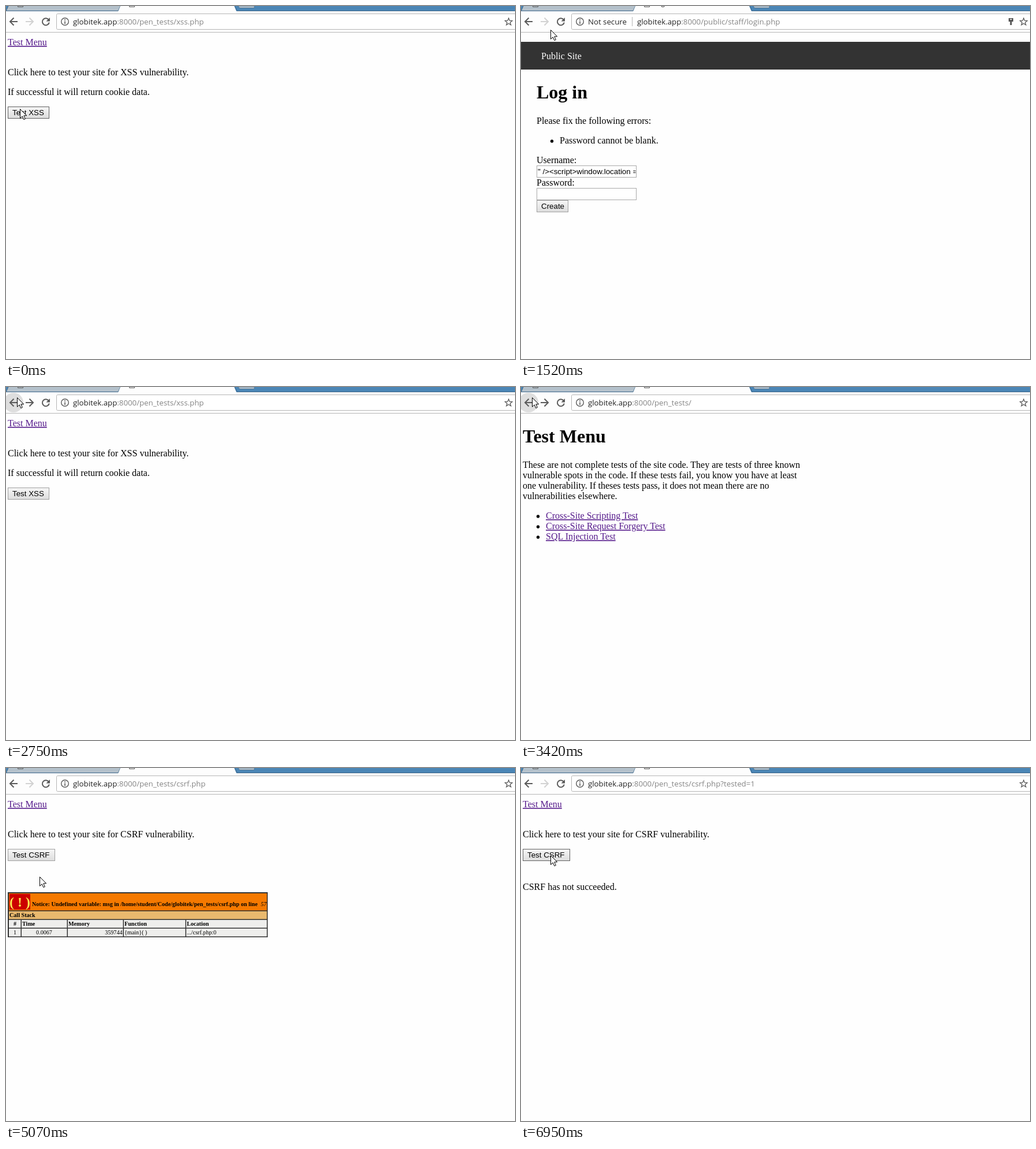
An HTML page for the animation above (8 s loop, 881 by 611 pixels).

```html
<!DOCTYPE html>
<html lang="en">
<head>
<meta charset="utf-8">
<title>Penetration tests</title>
<style>
  html, body { margin: 0; width: 100%; height: 100%; overflow: hidden; background: #fefefe; }
  svg { display: block; width: 881px; height: 611px; }
  text { font: 16px "Liberation Serif", serif; fill: #000; }
  .link { fill: #551a8b; text-decoration: underline; }
  .link.active { fill: #e00; }
  .title { font-size: 32px; font-weight: bold; }
  .form text { font: 13.333px "Liberation Sans", sans-serif; }
  .form rect { fill: #fff; stroke: #a9a9a9; }
  .form .button { fill: url(#face); stroke: #a0a0a0; }
  .form .button.hover { stroke: #606060; }
  .form .button.pressed { fill: #ddd; }
  .url text { font: 13.25px "Open Sans", sans-serif; fill: #222; }
  .url .path { fill: #858585; }
  .icon { fill: none; stroke: #5a5a5a; stroke-width: 2; }
  .off { stroke: #d2d2d2; }
  .trace text { font-size: 10.15px; }
  .trace .b { font-weight: bold; }
  .trace .alert { font-size: 24px; font-weight: bold; fill: #fce94f; }
  .cells { fill: #eeeeec; }
  .pointer { fill: #fff; stroke: #000; stroke-linejoin: round; }
</style>
</head>
<body>
<svg viewBox="0 0 881 611">
  <defs>
    <linearGradient id="face" x2="0" y2="1">
      <stop stop-color="#f6f6f6"/><stop offset="1" stop-color="#dddddd"/>
    </linearGradient>
    <clipPath id="field"><rect x="28" y="277" width="170.5" height="19"/></clipPath>
  </defs>
  <rect width="881" height="611" fill="#fefefe"/>

  <!-- Browser frame -->
  <rect width="881" height="9" fill="#4b86b6"/>
  <path d="M0 9L4 0H198L194 9Z" fill="#b4c1cb"/>
  <path d="M0 8.5H194L198 0M4 0L0 9M396 0L400 8.5H881" fill="none" stroke="#3c668a"/>
  <path d="M194 9.5L198 0H395L399 9.5Z" fill="#fdfdfd"/>
  <path d="M402 0H430V2Q430 3.5 428 3.5H406Q404 3.5 403 2Z" fill="#b4c1cb" stroke="#3c668a" stroke-width=".7"/>
  <path d="M20.5 0V1.5H29.5V0M213.5 0V1.5H222.5V0" fill="none" stroke="#555"/>
  <g class="url" data-on="login"><text x="229" y="-1" style="font-size:12px">Log in</text></g>
  <rect y="9.5" width="881" height="36" fill="#fdfdfd"/>
  <path d="M0 45.5H881" stroke="#b6b6b6"/>
  <circle id="ripple" cx="13" cy="27" fill="#dedede"/>
  <path class="icon" d="M20 27H7.5M13.5 20.5L7 27L13.5 33.5"/>
  <path class="icon" id="forward" d="M34 27H46.5M40.5 20.5L47 27L40.5 33.5"/>
  <path class="icon" d="M74 24A6 6 0 1 0 74.8 28.5"/>
  <path d="M76 20V26.5H69.5Z" fill="#5a5a5a"/>
  <rect x="87.5" y="13.5" width="800" height="27" rx="2" fill="#fff" stroke="#b5b5b5"/>
  <circle cx="102" cy="27" r="6.3" class="icon" style="stroke-width:1.4"/>
  <path d="M102 23V25M102 26.2V31" class="icon" style="stroke-width:1.6"/>
  <path d="M870 21L871.7 25.2L876.2 25.5L872.7 28.4L873.9 32.8L870 30.3L866.1 32.8L867.3 28.4L863.8 25.5L868.3 25.2Z"
        class="icon" style="stroke-width:1.3"/>

  <!-- Addresses -->
  <g class="url">
    <text x="116" y="32" data-on="xss">globitek.app<tspan class="path">:8000/pen_tests/xss.php</tspan></text>
    <text x="116" y="32" data-on="menu">globitek.app<tspan class="path">:8000/pen_tests/</tspan></text>
    <text x="116" y="32" data-on="csrf">globitek.app<tspan class="path">:8000/pen_tests/csrf.php</tspan></text>
    <text x="116" y="32" data-on="done">globitek.app<tspan class="path">:8000/pen_tests/csrf.php?tested=1</tspan></text>
    <g data-on="login">
      <text x="116" y="32">Not secure</text>
      <path d="M192.5 19V35" stroke="#b5b5b5"/>
      <text x="201" y="32">globitek.app<tspan class="path">:8000/public/staff/login.php</tspan></text>
      <path d="M844 21H852V27H849.5V33H846.5V27H844ZM846.5 22.5V24H849.5V22.5Z" fill="#555" fill-rule="evenodd"/>
    </g>
  </g>

  <text class="link" x="3" y="68" data-on="xss csrf done">Test Menu</text>

  <g data-on="xss">
    <text x="3" y="120">Click here to test your site for XSS vulnerability.</text>
    <text x="3" y="154">If successful it will return cookie data.</text>
    <g class="form">
      <rect class="button" x="3.5" y="174.5" width="71" height="20"/>
      <text x="11" y="189">Test XSS</text>
    </g>
  </g>

  <g data-on="login">
    <rect y="62" width="881" height="48" fill="#333"/>
    <text x="35" y="92" style="fill:#fff">Public Site</text>
    <text class="title" x="27" y="160">Log in</text>
    <text x="27" y="204">Please fix the following errors:</text>
    <circle cx="53.5" cy="234" r="2.7"/>
    <text x="67" y="238">Password cannot be blank.</text>
    <text x="27" y="272">Username:</text>
    <text x="27" y="311">Password:</text>
    <g class="form">
      <rect x="27.5" y="276.5" width="172" height="20"/>
      <text x="29" y="291" clip-path="url(#field)">" /&gt;&lt;script&gt;window.location = </text>
      <rect x="27.5" y="315.5" width="172" height="20"/>
      <rect class="button" x="27.5" y="336.5" width="54" height="20"/>
      <text x="35" y="351">Create</text>
    </g>
  </g>

  <g data-on="menu">
    <text class="title" x="3" y="96">Test Menu</text>
    <text y="140"><tspan x="3">These are not complete tests of the site code. They are tests of three known</tspan>
      <tspan x="3" dy="18">vulnerable spots in the code. If these tests fail, you know you have at least</tspan>
      <tspan x="3" dy="18">one vulnerability. If theses tests pass, it does not mean there are no</tspan>
      <tspan x="3" dy="18">vulnerabilities elsewhere.</tspan></text>
    <circle cx="29.5" cy="224" r="2.7"/><circle cx="29.5" cy="242" r="2.7"/><circle cx="29.5" cy="260" r="2.7"/>
    <text class="link" x="43" y="228">Cross-Site Scripting Test</text>
    <text class="link" id="forgery" x="43" y="246">Cross-Site Request Forgery Test</text>
    <text class="link" x="43" y="264">SQL Injection Test</text>
  </g>

  <g data-on="csrf done">
    <text x="3" y="120">Click here to test your site for CSRF vulnerability.</text>
    <g class="form">
      <rect class="button" x="3.5" y="140.5" width="81" height="20"/>
      <text x="11" y="155">Test CSRF</text>
    </g>
  </g>
  <text x="3" y="211" data-on="done">CSRF has not succeeded.</text>

  <g class="trace" data-on="csrf">
    <rect x="3" y="215" width="450" height="78" fill="#333"/>
    <rect x="5" y="217" width="446.5" height="29.5" fill="#f57900"/>
    <rect x="5" y="248" width="446.5" height="13.5" fill="#e9b96e"/>
    <path class="cells" d="M5 263H25.5V276.5H5ZM27 263H105.5V276.5H27ZM107 263H202.5V276.5H107ZM204 263H310.5V276.5H204ZM312 263H451.5V276.5H312Z"/>
    <path class="cells" transform="translate(0 15)" d="M5 263H25.5V276.5H5ZM27 263H105.5V276.5H27ZM107 263H202.5V276.5H107ZM204 263H310.5V276.5H204ZM312 263H451.5V276.5H312Z"/>
    <rect x="6" y="218" width="36" height="27" fill="#c00"/>
    <text class="alert" x="6" y="240">( ! )</text>
    <text class="b" x="45" y="239">Notice: Undefined variable: msg in /home/student/Code/globitek/pen_tests/csrf.php on line</text>
    <text x="441" y="239" font-style="italic" style="font-style:italic">57</text>
    <text class="b" x="6" y="258">Call Stack</text>
    <g class="b">
      <text class="b" x="15.5" y="273" text-anchor="middle">#</text>
      <text class="b" x="28" y="273">Time</text>
      <text class="b" x="108" y="273">Memory</text>
      <text class="b" x="205" y="273">Function</text>
      <text class="b" x="313" y="273">Location</text>
    </g>
    <text x="15.5" y="288" text-anchor="middle">1</text>
    <text x="66" y="288" text-anchor="middle">0.0067</text>
    <text x="201.5" y="288" text-anchor="end">359744</text>
    <text x="205" y="288">{main}( )</text>
    <text x="313" y="288">.../csrf.php:0</text>
  </g>

  <g id="cursor">
    <path class="pointer" id="arrow" d="M.5 .5V16.3L4.2 12.8L6.8 18.6L9.3 17.5L6.8 11.8H11.7Z"/>
    <path class="pointer" id="hand" d="M-1.5 14V2Q-1.5 .5 0 .5Q1.8 .5 1.8 2V7.5Q2 6 3.4 6Q4.9 6 4.9 7.6Q5.2 6.6 6.4 6.7Q7.7 6.8 7.8 8.4Q9.8 7.6 9.8 10V15Q9.8 18 7.8 20V22.5H-1V20.5Q-3 18.5 -4.5 15.5L-6.8 12.5Q-7.3 10.8 -5.8 10.5Q-4.5 10.3 -3 12ZM1.8 7.5V11.5M4.9 7.6V11.5M7.8 8.4V11.5"/>
    <circle id="ring" cx=".5" cy="1.5" r="10" fill="none" stroke="#222" stroke-width="1.2"/>
  </g>
</svg>
<script>
  const LOOP = 8000;

  // Every table starts its rows with a time in ms; values hold until the next row.
  const pages = [[0, 'xss'], [410, 'login'], [2750, 'xss'], [3300, 'menu'], [4510, 'csrf'], [6950, 'done']];
  const moves = [
    [0, 24, 178], [150, 25, 178], [1520, 51, 41], [1660, 57, 56], [1790, 64, 71],
    [1930, 67, 81], [2210, 40, 45], [2340, 19, 18], [3560, 148, 245], [3840, 148, 248],
    [3960, 148, 251], [4110, 149, 248], [4260, 148, 245], [4790, 137, 250], [4940, 102, 240],
    [5070, 58, 188], [5490, 57, 178], [5610, 53, 164], [5730, 51, 156], [6290, 51, 155],
    [6415, 51, 153], [6540, 51, 151]
  ];
  const ripples = [[0, 0], [2340, 12], [2750, 17], [3560, 0]];
  const clicks = [[290, 410], [2600, 2750], [3170, 3300], [4380, 4510], [6680, 6950]];
  const hands = [[1930, 2210], [3560, 4790]];
  const hovers = [[0, 410], [5730, LOOP]];
  const presses = [[290, 410], [6680, 6800]];

  const $ = id => document.getElementById(id);
  const at = (rows, t) => rows.findLast(row => row[0] <= t);
  const within = (spans, t) => spans.some(([from, to]) => t >= from && t < to);
  const show = (el, on) => { el.style.display = on ? '' : 'none'; };
  const parts = [...document.querySelectorAll('[data-on]')];
  const buttons = [...document.querySelectorAll('.button')];

  function draw(t) {
    const page = at(pages, t)[1];
    for (const part of parts) show(part, part.dataset.on.split(' ').includes(page));

    const [, x, y] = at(moves, t);
    const hand = within(hands, t);
    const click = within(clicks, t);
    $('cursor').setAttribute('transform', `translate(${x} ${y})`);
    show($('hand'), hand);
    show($('arrow'), !hand);
    show($('ring'), click);

    $('ripple').setAttribute('r', at(ripples, t)[1]);
    $('forward').classList.toggle('off', !within([[2750, 4510]], t));
    $('forgery').classList.toggle('active', click);
    for (const button of buttons) {
      button.classList.toggle('hover', within(hovers, t));
      button.classList.toggle('pressed', within(presses, t));
    }
  }

  const start = performance.now();
  function tick() {
    draw((performance.now() - start) % LOOP);
    requestAnimationFrame(tick);
  }
  tick();
</script>
</body>
</html>
```
